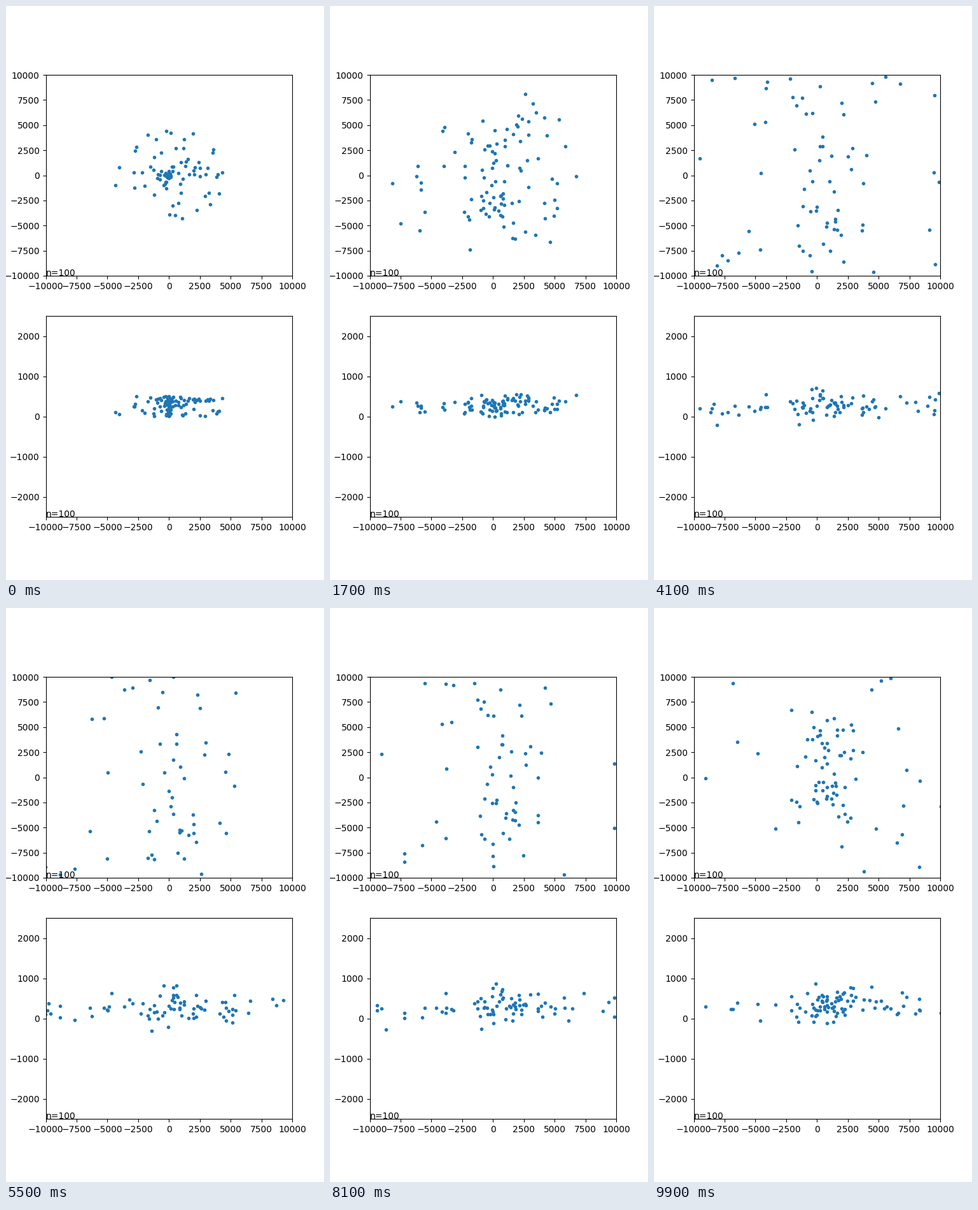
A matplotlib script that plays this animation: 500 px wide and 900 px high, repeating every 10 s.

```python
import numpy as np
import matplotlib.pyplot as plt
from matplotlib.animation import FuncAnimation

N, INNER, FRAMES = 100, 56, 100
SPAN, DEPTH = 10000, 2500
rng = np.random.default_rng(12)


def polar(r):
    a = rng.uniform(0, 2 * np.pi, len(r))
    return np.column_stack([r * np.cos(a), r * np.sin(a)])


# A flat disc, densest in the middle.
start_xy = polar(5000 * rng.random(N) ** 2.2)
start_z = rng.uniform(-250, 250, N)
start = np.column_stack([start_xy, start_z])

# Inner bodies are thrown into a tall column, the others into a wide ring.
column = np.column_stack([
    rng.normal(0, 2400, INNER),
    rng.uniform(-11000, 11000, INNER),
])
far = rng.random(N - INNER)
ring = polar(10000 + 12500 * far)
throw = np.column_stack([np.vstack([column, ring]), rng.normal(0, 220, N)])

# Time at which each body turns back, per axis.
turn_xy = np.append(np.full(INNER, 58), 60 + 15 * far)
turn = np.column_stack([turn_xy, turn_xy, np.full(N, 72)])
centre = np.array([0, 0, 250])
drift = np.array([700, 1300, 50])


def bodies(t):
    swing = np.sin(np.pi * t / (2 * turn))
    shift = centre + drift * (t / FRAMES) ** 2
    return start * np.cos(np.pi * t / 60) + throw * swing + shift


def panel(ax, ymax):
    ax.set_xlim(-SPAN, SPAN)
    ax.set_ylim(-ymax, ymax)
    ax.text(-SPAN, -ymax, f"n={N}")
    return ax.plot([], [], ".", color="#1f77b4")[0]


fig, (top_ax, side_ax) = plt.subplots(2, 1, figsize=(5, 9), dpi=100)
top = panel(top_ax, SPAN)
side = panel(side_ax, DEPTH)


def update(i):
    x, y, z = bodies(i).T
    top.set_data(x, y)
    side.set_data(x, z)
    return top, side


anim = FuncAnimation(fig, update, frames=FRAMES, interval=100, repeat=True,
                     repeat_delay=0)
plt.show()
```
